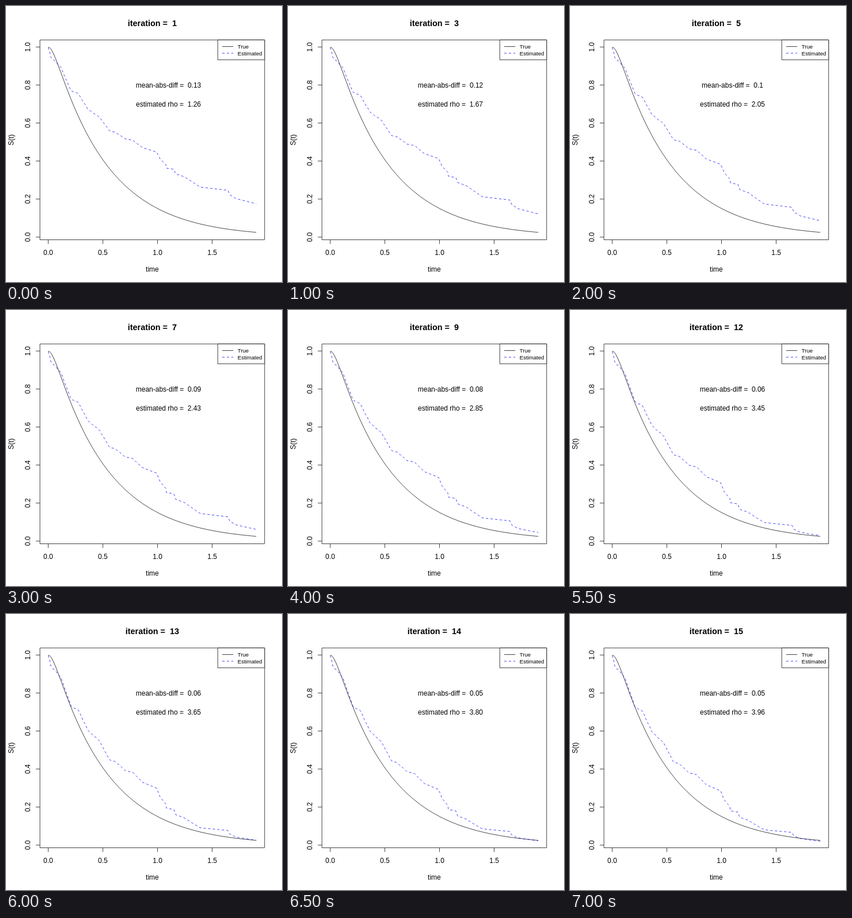
These frames come from a looping animation (480 by 480 pixels, 7500 ms). An HTML page with a canvas:

```html
<!DOCTYPE html>
<html lang="en">
<head>
<meta charset="utf-8">
<title>Survival curve estimate</title>
<style>
html, body { margin: 0; width: 100%; height: 100%; overflow: hidden; background: #fff; }
canvas { display: block; }
</style>
</head>
<body>
<canvas id="plot" width="480" height="480"></canvas>
<script>
const ctx = document.getElementById('plot').getContext('2d');
const STEP = 500, COUNT = 15;
const FONT = '"Liberation Sans", Arial, sans-serif';
const BOX = { left: 59.04, top: 59.04, right: 449.76, bottom: 406.56 };

// Key points: [iteration, rho] and the bends of the first estimate in pixels
const rhoKeys = [[0, 1.26], [2, 1.67], [6, 2.43], [9, 3.06], [12, 3.65], [14, 3.96]];
const bends = [
  [73.5, 72], [78, 89], [95, 106], [113, 147], [126, 153], [142, 179],
  [163, 193.5], [180, 217], [191, 220], [207, 231], [220, 233], [237, 246],
  [262, 254], [268, 266], [278, 276], [279, 282], [292, 284], [295, 292],
  [310, 297], [338, 315], [386, 320.5], [389, 328], [400, 335], [435.3, 344]
];

const px = t => 73.4 + 190.1 * t;
const py = s => 401.9 - 330.6 * s;
const surv = y => Math.min(1, (401.9 - y) / 330.6);

function lerpKeys(keys, x) {
  const i = Math.max(1, keys.findIndex(k => k[0] >= x));
  const [x0, y0] = keys[i - 1], [x1, y1] = keys[i];
  return y0 + (y1 - y0) * (x - x0) / (x1 - x0);
}

// Small steps, densest at early times where most events fall
function roughen(keys) {
  let seed = 7;
  const rand = () => (seed = seed * 16807 % 2147483647) / 2147483647;
  const pts = [];
  keys.forEach(([x, y], i) => {
    pts.push([x, y]);
    if (i === keys.length - 1) return;
    const end = keys[i + 1][0];
    for (let p = x + 3; p < end - 1; p += 3) {
      const amp = 2.5 * Math.max(0, 1 - (p - 73) / 190);
      pts.push([p, lerpKeys(keys, p) + amp * (rand() - .5)]);
    }
  });
  return pts;
}
const start = roughen(bends);

function path(pts, color, dash = []) {
  ctx.strokeStyle = color;
  ctx.lineWidth = .75;
  ctx.setLineDash(dash);
  ctx.beginPath();
  pts.forEach(([x, y]) => ctx.lineTo(x, y));
  ctx.stroke();
  ctx.setLineDash([]);
}

function frame(x0, y0, x1, y1) {
  path([[x0, y0], [x1, y0], [x1, y1], [x0, y1], [x0, y0]], '#000');
}

function label(text, x, y, { size = 12, weight = 'normal', align = 'center', turn = 0 } = {}) {
  ctx.save();
  ctx.translate(x, y);
  ctx.rotate(turn);
  ctx.font = `${weight} ${size}px ${FONT}`;
  ctx.textAlign = align;
  ctx.fillStyle = '#000';
  ctx.fillText(text, 0, 0);
  ctx.restore();
}

function trueCurve() {
  const pts = [];
  for (let t = .003; t <= 1.904; t += .01) {
    pts.push([px(t), py(1.1 * Math.exp(-1.99 * t) - .1 * Math.exp(-21.9 * t))]);
  }
  return pts;
}

// The cumulative hazard grows with the fit, most where it is already large
function estimate(w) {
  return start.map(([x, y]) => {
    const u = -Math.log(surv(y));
    const gain = w * (.06 + .62 * u) + w * w * .35 * Math.max(0, u - 1.45);
    return [x, py(Math.exp(-u * (1 + gain)))];
  });
}

function axes() {
  const turn = -Math.PI / 2;
  frame(BOX.left, BOX.top, BOX.right, BOX.bottom);
  for (let t = 0; t < 2; t += .5) {
    path([[px(t), BOX.bottom], [px(t), BOX.bottom + 7.2]], '#000');
    label(t.toFixed(1), px(t), 432.7);
  }
  for (let i = 0; i <= 5; i++) {
    const y = py(i / 5);
    path([[BOX.left - 7.2, y], [BOX.left, y]], '#000');
    label((i / 5).toFixed(1), 41.8, y, { turn });
  }
  label('time', 254.4, 461.7);
  label('S(t)', 13, 232.8, { turn });
}

function legend() {
  const opts = { size: 9.6, align: 'left' };
  ctx.fillStyle = '#fff';
  ctx.fillRect(368.3, BOX.top, BOX.right - 368.3, 34.56);
  frame(368.3, BOX.top, BOX.right, BOX.top + 34.56);
  path([[376, 70.56], [395.2, 70.56]], '#000');
  path([[376, 82.08], [395.2, 82.08]], '#00f', [4, 4]);
  label('True', 402.8, 74, opts);
  label('Estimated', 402.8, 85.6, opts);
}

function draw(n) {
  const p = n / (COUNT - 1);
  const fit = p * (1.3 - .3 * p);
  const diff = Number((.13 - .08 * fit).toFixed(2));
  ctx.fillStyle = '#fff';
  ctx.fillRect(0, 0, 480, 480);
  path(trueCurve(), '#000');
  path(estimate(fit), '#00f', [4, 4]);
  axes();
  legend();
  label(`iteration =  ${n + 1}`, 254.4, 35, { size: 14.4, weight: 'bold' });
  label(`mean-abs-diff =  ${diff}`, 282.5, 142);
  label(`estimated rho =  ${lerpKeys(rhoKeys, n).toFixed(2)}`, 282.5, 175);
}

let shown = -1;
const begin = performance.now();
function tick() {
  const n = Math.floor(Math.max(0, performance.now() - begin) / STEP) % COUNT;
  if (n !== shown) draw(shown = n);
  requestAnimationFrame(tick);
}
tick();
</script>
</body>
</html>
```
